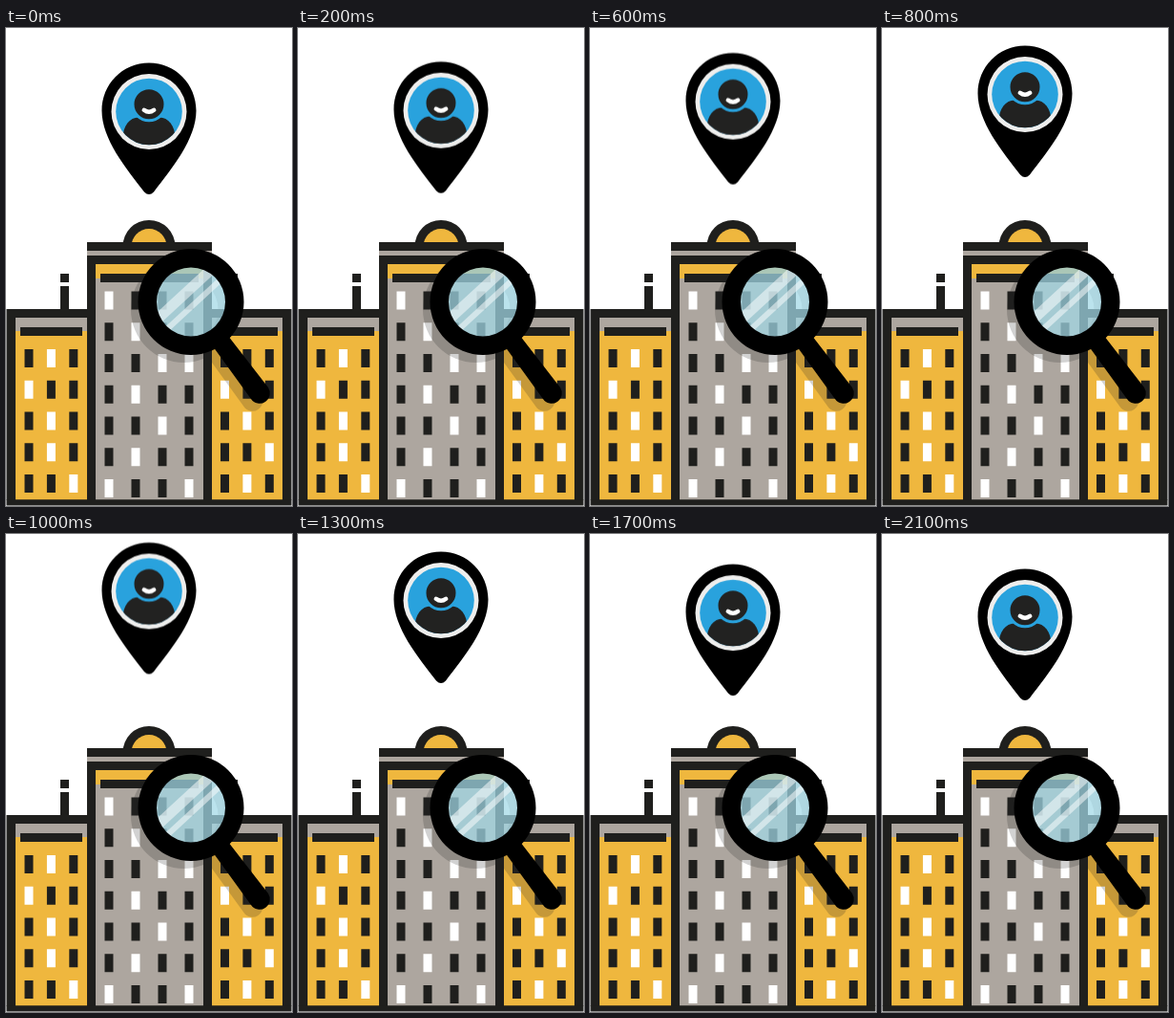
An HTML page that plays this animation: 300x500 px, repeating every 2200 ms.

```html
<!DOCTYPE html>
<html lang="en">
<head>
<meta charset="utf-8">
<title>Building search</title>
<style>
  html, body { margin: 0; width: 100%; height: 100%; overflow: hidden; background: #fff; }
  svg { display: block; width: 300px; height: 500px; }
  .ink { fill: #1f1f1d; }
  .gold { fill: #efb73e; }
  .stone { fill: #ada69f; }
  .lit { fill: #fff; }

  /* Accelerates upward in 100 ms steps, then runs back the same way. */
  #pin { animation: rise 1100ms step-end -2ms infinite alternate; }
  @keyframes rise {
    0% { transform: translateY(0); }
    9.0909% { transform: translateY(-.3px); }
    18.1818% { transform: translateY(-1.3px); }
    27.2727% { transform: translateY(-2.8px); }
    36.3636% { transform: translateY(-4.9px); }
    45.4545% { transform: translateY(-7.4px); }
    54.5455% { transform: translateY(-10.4px); }
    63.6364% { transform: translateY(-14px); }
    72.7273% { transform: translateY(-18px); }
    81.8182% { transform: translateY(-22.5px); }
    90.9091%, 100% { transform: translateY(-27.5px); }
  }
</style>
</head>
<body>
<svg viewBox="0 0 300 500">
  <defs>
    <clipPath id="face"><circle cx="150" cy="87.5" r="34.8"/></clipPath>
    <clipPath id="glass"><circle cx="194" cy="286.5" r="37"/></clipPath>
    <g id="wing">
      <path class="ink" d="M57 257h9v9h-9zM57 270h9v26h-9zM.5 294h86v200h-86z"/>
      <path class="gold" d="M10 303h75v190.500H10z"/>
      <path class="stone" d="M10 303h75v14H10z"/>
      <path class="ink" d="M15 313h65v9H15z"/>
    </g>
    <g id="loupe">
      <path fill-rule="evenodd" d="M138.500 286.500a55.500 55.500 0 1 0 111 0a55.500 55.500 0 1 0-111 0zM158 286.500a36 36 0 1 1 72 0a36 36 0 1 1-72 0z"/>
      <path d="M217 333L233 322L275 376A10.500 10.500 0 0 1 257 388Z"/>
    </g>
  </defs>

  <use href="#wing"/>
  <use href="#wing" transform="matrix(-1 0 0 1 300 0)"/>

  <circle class="ink" cx="150" cy="228.5" r="27.5"/>
  <circle class="gold" cx="150" cy="228.5" r="18.5"/>
  <path class="ink" d="M85 224h131v270H85z"/>
  <path class="stone" d="M85 233h131v5H85zM94 262h113v231.500H94z"/>
  <path class="gold" d="M94 247h113v15H94z"/>
  <path class="ink" d="M99 257h103v9H99z"/>
  <g id="windows"></g>
  <path class="ink" d="M.5 493.500h299v6H.5z"/>

  <use href="#loupe" x="-7.5" y="8" fill="#222" opacity=".2"/>
  <g clip-path="url(#glass)">
    <circle cx="194" cy="286.5" r="37" fill="#a2d9e6" opacity=".73"/>
    <g stroke="#fff" opacity=".5">
      <path d="M155 308L217 251" stroke-width="11"/>
      <path d="M170 314L232 257" stroke-width="6"/>
    </g>
  </g>
  <use href="#loupe"/>

  <g id="pin">
    <path d="M150 36.500C122 36.500 100.500 59 100.500 86.500C100.500 116 126 147 145 171.500Q150 176.500 155 171.500C174 147 199.500 116 199.500 86.500C199.500 59 178 36.500 150 36.500Z"/>
    <circle cx="150" cy="87.5" r="39.5" fill="#eeeeed"/>
    <circle cx="150" cy="87.5" r="34.8" fill="#29a2dd"/>
    <g clip-path="url(#face)" fill="#222221">
      <path d="M122.500 116C122.500 102 130 93.500 139 93.500H161C170 93.500 177.500 102 177.500 116V125H122.500Z"/>
      <circle cx="150" cy="79.8" r="17" stroke="#29a2dd" stroke-width="3"/>
    </g>
    <path d="M144.800 85.800Q150 89.800 155.200 85.800" fill="none" stroke="#fff" stroke-width="4.5" stroke-linecap="round"/>
  </g>
</svg>
<script>
  // Each string is one floor: 1 marks a lit window.
  function addWindows(x, y, pitch, floors) {
    floors.forEach((floor, row) => [...floor].forEach((state, col) => {
      const pane = document.createElementNS('http://www.w3.org/2000/svg', 'rect');
      const box = { x: x + col * pitch, y: y + row * 32.75, width: 9, height: 19 };
      for (const key in box) pane.setAttribute(key, box[key]);
      pane.setAttribute('class', state === '1' ? 'lit' : 'ink');
      document.getElementById('windows').append(pane);
    }));
  }
  addWindows(19.5, 336, 23.4, ['010', '100', '010', '010', '001']);
  addWindows(225, 336, 23.4, ['000', '100', '010', '001', '010']);
  addWindows(103.5, 275.5, 28, ['1000', '0100', '0011', '0100', '0010', '0100', '1001']);
</script>
</body>
</html>
```
